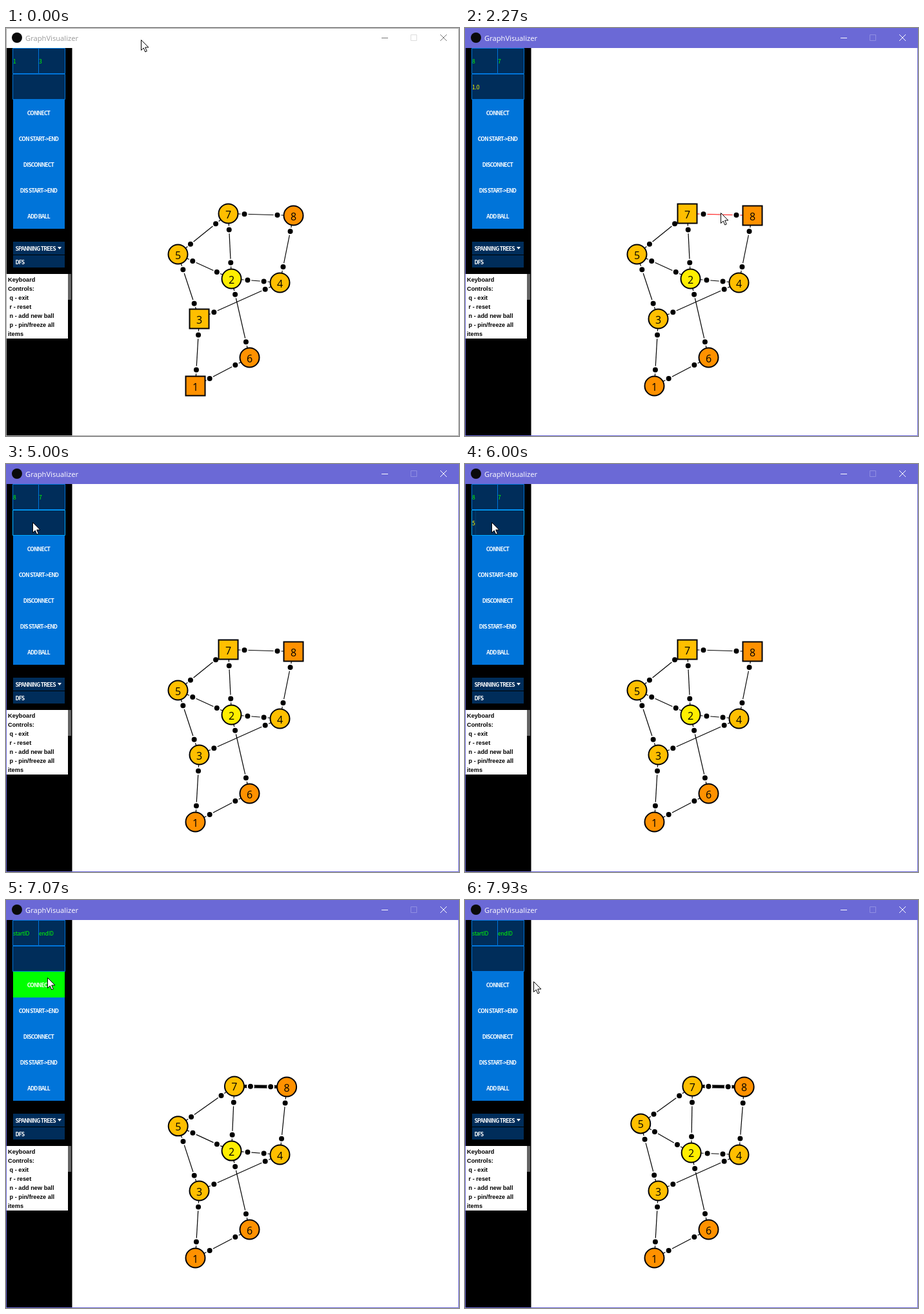
These frames come from a looping animation (702x632 px, 8 s). An HTML page:

```html
<!DOCTYPE html>
<html lang="en">
<head>
<meta charset="utf-8">
<title>GraphVisualizer</title>
<style>
  html, body { margin: 0; width: 100%; height: 100%; overflow: hidden; background: #fff; }
  svg { display: block; }
  text { white-space: pre; }
  .bar { fill: #fff; }
  .title { font: 11.2px "Open Sans", "Noto Sans", sans-serif; fill: #999; }
  .ctl { fill: none; stroke: #777; }
  .max { stroke: #ddd; }
  .frame { fill: none; stroke: #a4a4a4; }
  .active .bar { fill: #6b69d6; }
  .active .title { fill: #fff; }
  .active .ctl { stroke: #fff; }
  .active .max { stroke: #908ee2; }
  .active .frame { stroke: #6b69d6; }
  .ui { font: 700 8.6px "Noto Sans CJK JP", "Noto Sans CJK SC", "Noto Sans", sans-serif; fill: #fff; letter-spacing: -.8px; }
  .mid { text-anchor: middle; }
  .field { fill: #002d5a; stroke: #0074d9; }
  .focus { stroke: #00aaff; }
  .id, .weight { font-weight: 500; letter-spacing: -.2px; }
  .id { fill: #0f0; }
  .weight { fill: #ff0; }
  .help { font: bold 9.2px "Liberation Sans", Arial, sans-serif; }
  .num { font: 16px "Open Sans", "Noto Sans", sans-serif; text-anchor: middle; }
  .node { stroke: #000; stroke-width: 2; }
  .dot { stroke: #fff; stroke-width: 2; }
</style>
</head>
<body>
<svg id="stage" width="702" height="632" viewBox="0 0 702 632">
  <rect width="702" height="632" fill="#fff"/>
  <rect class="bar" width="702" height="31"/>
  <circle cx="17" cy="15" r="8" fill="#0a0a0a"/>
  <text class="title" x="30" y="20">GraphVisualizer</text>
  <path class="ctl" d="M582 15.5h10"/>
  <path class="ctl max" d="M627.5 10.5h9v9h-9z"/>
  <path class="ctl" d="M673 10l10 10m0-10l-10 10"/>
  <path d="M1 31h101.500v600H1z"/>
  <path class="frame" d="M.5 .5h701v631H.5z"/>

  <path class="field" d="M10.500 31.500h40v39h-40zM50.500 31.500h41v39h-41z"/>
  <path class="field" id="weightBox" d="M10.500 71.500h81v39h-81z"/>
  <text class="ui id" id="startId" x="11" y="55"></text>
  <text class="ui id" id="endId" x="51" y="55"></text>
  <text class="ui weight" id="weight" x="11" y="95"></text>
  <path id="caret" d="M11.500 72v38" stroke="#00aaff"/>
  <path fill="#0074d9" d="M11 111h80v200H11z"/>
  <path id="connect" fill="#0f0" d="M11 111h80v40H11z"/>
  <g id="buttons"></g>
  <path fill="#002d5a" d="M11 331h80v20H11zM11 352h80v19H11z"/>
  <text class="ui" x="14.500" y="345">SPANNING TREES</text>
  <path fill="#fff" d="M80 339h6l-3 4z"/>
  <text class="ui" x="14.500" y="366">DFS</text>
  <path fill="#fff" d="M1 381h95v100H1z"/>
  <path fill="#646464" d="M96 381h5v40h-5z"/>
  <g id="help"></g>

  <g id="edges"></g>
  <g id="nodes"></g>
  <path id="cursor" d="M.5 .5v16l3.700-3.500 2.600 6 2.500-1.100-2.600-5.900h5.200z" fill="#fff" stroke="#000"/>
</svg>
<script>
const LOOP = 8000, STEP = 200 / 3;
const HOVER = 760, ACTIVATE = 2260, FOCUS = 4390, TYPE = 5590, CLICK = 6860;

const $ = id => document.getElementById(id);

function set(el, attrs) {
  for (const key in attrs) el.setAttribute(key, attrs[key]);
}

function add(parent, tag, attrs, text) {
  const el = document.createElementNS('http://www.w3.org/2000/svg', tag);
  set(el, attrs);
  if (text) el.textContent = text;
  parent.appendChild(el);
  return el;
}

['CONNECT', 'CON START->END', 'DISCONNECT', 'DIS START->END', 'ADD BALL'].forEach((label, i) =>
  add($('buttons'), 'text', { class: 'ui mid', x: 50.5, y: 135 + 40 * i }, label));

['Keyboard', 'Controls:', ' q - exit', ' r - reset', ' n - add new ball', ' p - pin/freeze all', 'items']
  .forEach((line, i) => add($('help'), 'text', { class: 'help', x: 3, y: 393 + 14 * i }, line));

// pull: share of the tightened spring; trail: slow drag by the neighbours
const balls = [
  { x: 293, y: 554 },
  { x: 349, y: 388, trail: [1, 2.6] },
  { x: 299, y: 450 },
  { x: 424, y: 394 },
  { x: 266, y: 350, trail: [5, -3.5] },
  { x: 377, y: 510 },
  { x: 344, y: 287, pull: 1 },
  { x: 445, y: 290, pull: -1 }
];
const links = ['13', '16', '24', '25', '26', '27', '34', '35', '48', '57', '78'];
const degreeFill = { 2: '#ff9100', 3: '#ffbf00', 4: '#ffee00' };

const edges = links.map(ends => {
  const g = add($('edges'), 'g', {});
  return {
    a: ends[0] - 1, b: ends[1] - 1,
    line: add(g, 'line', {}),
    dots: [1, 2].map(() => add(g, 'circle', { class: 'dot', r: 5 }))
  };
});
const heavy = edges[edges.length - 1];

const nodes = balls.map((_, i) => {
  const degree = links.filter(ends => ends.includes(i + 1)).length;
  const g = add($('nodes'), 'g', {});
  const box = add(g, 'rect', { class: 'node', x: -15, y: -15, width: 30, height: 30, fill: degreeFill[degree] });
  add(g, 'text', { class: 'num', y: 7 }, String(i + 1));
  return { g, box };
});

// Damped spring after the click, u in seconds
function ballAt({ x, y, pull = 0, trail = [0, 0] }, u) {
  const swing = 13.5 * (1 - Math.exp(-1.36 * u) * Math.cos(5.85 * u));
  const drift = pull ? -2.3 * u : 0;
  return [
    x + .5 + pull * swing + drift + trail[0] * u * u,
    y + .5 + pull * swing * .1 + trail[1] * u * u
  ];
}

const moves = [
  { from: 0, to: 867, x: 390, y: 293 },
  { from: 1200, to: 1467, x: 396, y: 286 },
  { from: 3000, to: 3867, x: 53, y: 84 },
  { from: 3867, to: 4000, x: 41, y: 90 },
  { from: 6067, to: 6533, x: 58, y: 119 },
  { from: 6733, to: 7400, x: 69, y: 120 },
  { from: 7467, to: 7933, x: 106, y: 126 }
];

function cursorAt(t) {
  let x = 209, y = 18;
  for (const move of moves) {
    const k = Math.min(1, Math.max(0, (t - move.from) / (move.to - move.from)));
    const eased = k * k * (3 - 2 * k);
    x += (move.x - x) * eased;
    y += (move.y - y) * eased;
  }
  return [Math.round(x), Math.round(y)];
}

function weightText(t) {
  if (t < HOVER || t >= CLICK) return '';
  if (t >= TYPE) return '5';
  const erased = Math.max(0, Math.floor((t - FOCUS) / 130) - 1);
  return '1.0'.slice(0, Math.max(0, 3 - erased));
}

function drawEdge(edge, at) {
  const [x1, y1] = at[edge.a], [x2, y2] = at[edge.b];
  const d = Math.hypot(x2 - x1, y2 - y1);
  const dx = (x2 - x1) / d * 25, dy = (y2 - y1) / d * 25;
  set(edge.line, { x1, y1, x2, y2 });
  set(edge.dots[0], { cx: x1 + dx, cy: y1 + dy });
  set(edge.dots[1], { cx: x2 - dx, cy: y2 - dy });
}

function draw(t) {
  const [cx, cy] = cursorAt(t);
  const connected = t >= CLICK, active = t >= ACTIVATE;
  const focused = t >= FOCUS && !connected;
  const picked = connected ? [] : active ? [8, 7] : [1, 3];

  set($('stage'), { class: active ? 'active' : '' });
  $('startId').textContent = connected ? 'startID' : picked[0];
  $('endId').textContent = connected ? 'endID' : picked[1];
  $('weight').textContent = weightText(t);
  set($('weightBox'), { class: focused ? 'field focus' : 'field' });
  set($('caret'), {
    transform: `translate(${Math.round($('weight').getComputedTextLength())} 0)`,
    opacity: focused ? .4 + .3 * Math.sin(t / 140) : 0
  });
  set($('connect'), { opacity: cx >= 11 && cx < 91 && cy >= 111 && cy < 151 ? 1 : 0 });

  const at = balls.map(ball => ballAt(ball, Math.max(0, t - CLICK) / 1000));
  const hover = !connected && cx > 369 && cx < 421 && Math.abs(cy - 288.5) < 6;
  edges.forEach(edge => {
    drawEdge(edge, at);
    set(edge.line, {
      stroke: edge === heavy && hover ? '#f00' : '#000',
      'stroke-width': edge === heavy && connected ? 5 : 1.2
    });
  });
  nodes.forEach((node, i) => {
    set(node.g, { transform: `translate(${at[i]})` });
    set(node.box, { rx: picked.includes(i + 1) ? 0 : 15 });
  });
  set($('cursor'), { transform: `translate(${cx} ${cy})` });
}

function tick() {
  const t = performance.now() % LOOP;
  draw(Math.floor((t + 3.4) / STEP) * STEP);
  requestAnimationFrame(tick);
}
tick();
</script>
</body>
</html>
```
